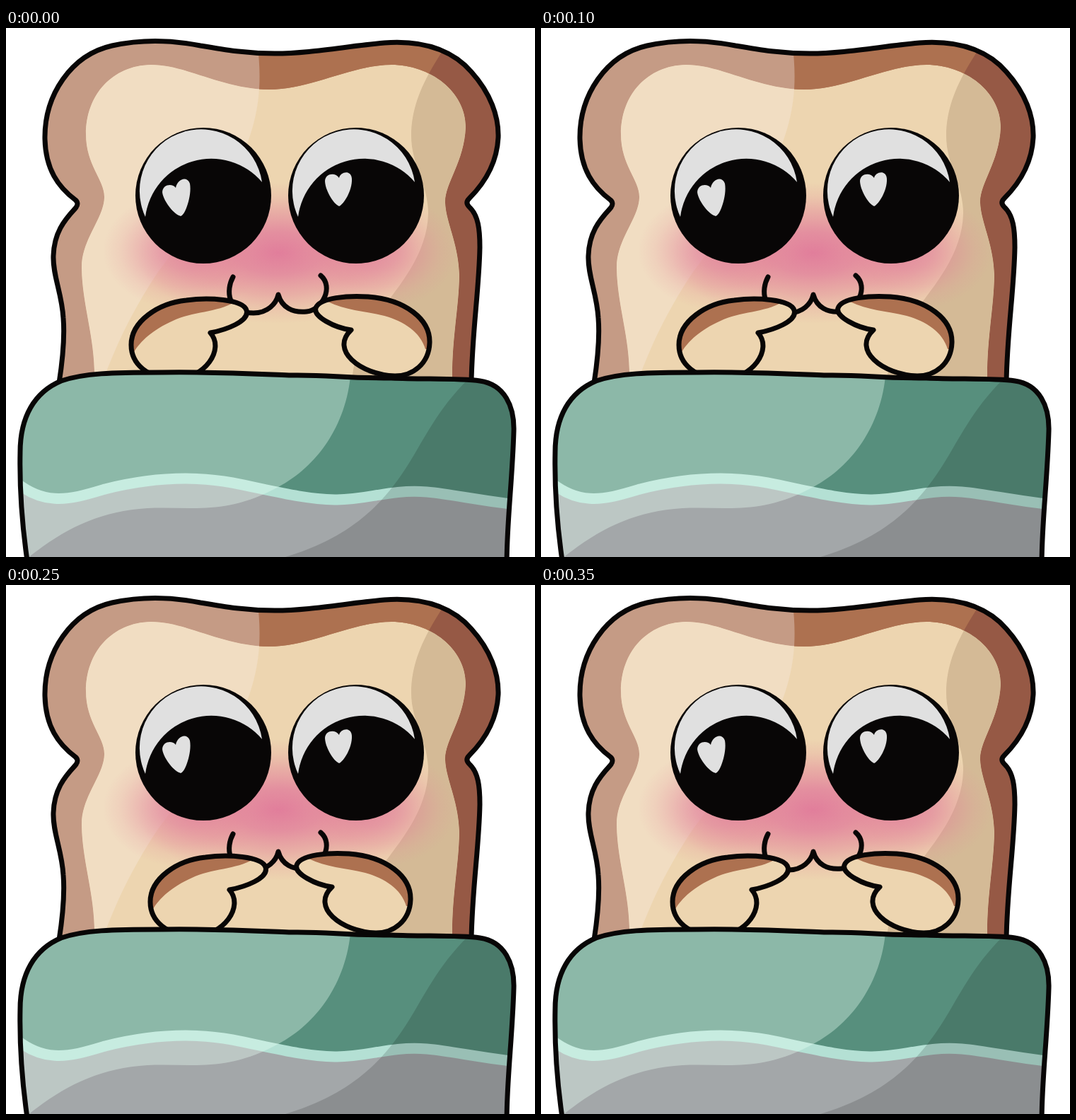
An HTML page without scripts that plays this animation: 748x748 px, repeating every 0.4 s.

```html
<!DOCTYPE html>
<html lang="en">
<head>
<meta charset="utf-8">
<title>Bashful toast</title>
<style>
  html, body { margin: 0; width: 100%; height: 100%; overflow: hidden; background: #fff; }
  svg { display: block; width: 100%; height: 100%; }
  .line { fill: none; stroke: #080606; stroke-width: 7; stroke-linecap: round; stroke-linejoin: round; }
  .crumb { fill: #edd5b0; }
  .crust { fill: #ad7150; }
  .hand { animation: poke 400ms steps(4, end) infinite; }
  .left { --reach: 36px; }
  .right { --reach: -36px; }
  @keyframes poke {
    0%, 100% { transform: translateX(0); }
    50% { transform: translateX(var(--reach)); }
  }
</style>
</head>
<body>
<svg viewBox="0 0 748 748">
  <defs>
    <path id="slice" d="M75 502C80 470 83 435 81 410C79 375 66 350 67 322C68 290 82 272 98 255Q104 248 98 243C74 225 56 200 55 157C54 95 92 38 150 25C195 15 235 17 275 25C310 31 340 36 380 36C430 36 480 26 535 21C590 17 630 30 658 62C685 92 697 125 696 155C694 195 674 222 655 241Q649 247 655 253C668 265 670 285 670 310C669 370 659 430 658 502"/>
    <path id="face" d="M125 502C127 440 108 395 107 340C106 300 138 270 139 240C140 215 113 195 113 150C113 95 150 53 205 52C255 52 305 86 372 87C430 87 490 52 545 52C600 52 650 90 650 140C648 190 620 220 621 247C622 275 640 305 641 350C640 400 630 440 631 502Z"/>
    <path id="glow" d="M0 0H352C365 75 360 130 325 200C290 250 240 310 215 345C185 390 158 440 135 505H0Z"/>
    <path id="shade" d="M748 0H640C600 55 573 100 573 152C573 195 597 220 597 262C596 320 555 365 530 400C510 430 490 460 489 505H748Z"/>
    <path id="blanket" d="M31 760C22 700 19 650 20 600C20 550 40 515 78 499C110 488 150 487 220 487C300 486 350 489 400 491C460 490 470 495 545 495C590 497 640 495 670 499C705 504 719 535 718 570C716 640 708 700 708 760"/>
    <path id="handL" d="M289 431C310 427 345 415 340 399C335 383 285 381 255 385C215 389 177 415 177 448C177 475 200 496 240 496C280 496 310 455 289 431Z"/>
    <path id="handR" d="M488 427C465 424 434 408 438 396C443 381 485 378 512 380C565 384 600 412 599 445C598 475 575 492 550 492C500 490 458 455 488 427Z"/>
    <g id="eye">
      <circle r="96" fill="#080606"/>
      <path fill="#e0e0e0" d="M-82 30A87 87 0 1 1 83 -19A94 94 0 0 0 -82 30Z"/>
    </g>
    <radialGradient id="blush">
      <stop offset="0" stop-color="#e17e9b"/>
      <stop offset=".3" stop-color="#e17e9b" stop-opacity=".8"/>
      <stop offset=".6" stop-color="#e38399" stop-opacity=".46"/>
      <stop offset=".8" stop-color="#e58c9b" stop-opacity=".2"/>
      <stop offset="1" stop-color="#e58c9b" stop-opacity="0"/>
    </radialGradient>
    <clipPath id="inSlice"><use href="#slice"/></clipPath>
    <clipPath id="inFace"><use href="#face"/></clipPath>
    <clipPath id="inBlanket"><use href="#blanket"/></clipPath>
    <clipPath id="inHandL"><use href="#handL"/></clipPath>
    <clipPath id="inHandR"><use href="#handR"/></clipPath>
  </defs>

  <!-- bread -->
  <g clip-path="url(#inSlice)">
    <use href="#slice" class="crust"/>
    <use href="#glow" fill="#c59b85"/>
    <use href="#shade" fill="#965945"/>
  </g>
  <g clip-path="url(#inFace)">
    <use href="#face" class="crumb"/>
    <use href="#glow" fill="#f1ddc2"/>
    <use href="#shade" fill="#d4ba96"/>
    <g fill="url(#blush)">
      <ellipse cx="385" cy="318" rx="200" ry="100"/>
      <ellipse cx="255" cy="315" rx="118" ry="85" opacity=".75"/>
      <ellipse cx="520" cy="315" rx="118" ry="85" opacity=".75"/>
    </g>
  </g>
  <use href="#slice" class="line"/>

  <!-- eyes and mouth -->
  <use href="#eye" x="279" y="237"/>
  <use href="#eye" x="495" y="237"/>
  <g fill="#e0e0e0">
    <path d="M247 266C236 263 222 243 221 232C222 220 236 220 240 226C242 214 256 208 260 220C263 236 254 264 247 266Z"/>
    <path d="M471 252C462 248 451 228 451 216C452 205 466 204 471 212C473 203 488 200 489 213C490 230 477 250 471 252Z"/>
  </g>
  <path class="line" d="M321 352C311 370 312 403 350 403C370 403 382 390 385 377C390 395 405 403 425 401C447 399 464 366 445 350"/>

  <!-- hands -->
  <g class="hand left">
    <g clip-path="url(#inHandL)">
      <use href="#handL" class="crumb"/>
      <path class="crust" d="M170 370H330L322 388C300 402 262 401 236 414C207 427 190 443 181 458H170Z"/>
    </g>
    <use href="#handL" class="line"/>
  </g>
  <g class="hand right">
    <g clip-path="url(#inHandR)">
      <use href="#handR" class="crumb"/>
      <path class="crust" d="M445 370H610V454H593C586 430 563 415 535 407C505 400 480 399 455 387Z"/>
    </g>
    <use href="#handR" class="line"/>
  </g>

  <!-- blanket -->
  <g clip-path="url(#inBlanket)">
    <use href="#blanket" fill="#578f7d"/>
    <path fill="#a3a7a9" stroke="#b4e0d4" stroke-width="15" d="M0 630C50 680 90 667 140 652C200 637 260 632 320 643C380 655 420 666 465 667C510 668 540 652 595 656C640 660 670 670 760 678V780H-20Z"/>
    <path fill="#e8fff4" opacity=".36" d="M0 480H488C484 560 440 620 385 649C310 690 260 676 200 679C130 683 80 710 30 750H0Z"/>
    <path opacity=".15" d="M652 498C610 540 592 580 570 615C530 680 480 724 388 750H748V490Z"/>
  </g>
  <use href="#blanket" class="line"/>
</svg>
</body>
</html>
```
